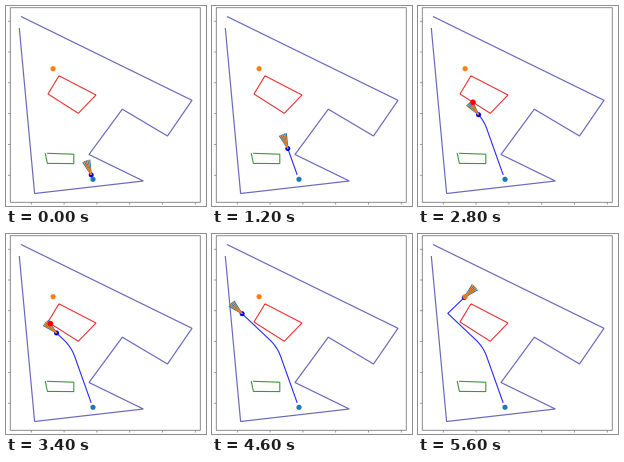
A matplotlib script that plays this animation: 200x200 px, repeating every 5.8 s.

```python
import numpy as np
import matplotlib.pyplot as plt
from matplotlib.animation import FuncAnimation
from matplotlib.patches import Circle

PX = 0.72  # one pixel in points at 100 dpi
STEPS, STEP_MS = 29, 200
SPEED, LAG = 4.67, 3  # pixels per step, pixels the view trails the motion
RAYS, REACH, SPREAD = 9, 15.3, np.radians(14)

START, GOAL = (87, 173.3), (47.1, 62.7)
FIRST, BEND, TURN = np.array([(85.2, 168.9), (65.3, 113), (29.8, 79.4)])
WALL = [(15, 10.5), (186, 94.3), (161.5, 130), (116.3, 103.2), (83, 148.5),
        (137.3, 175), (28.6, 187.5), (13.3, 22)]
RED_BOX = [(53, 69.8), (90, 89), (72.3, 107.3), (42, 88), (53, 69.8)]
GREEN_BOX = [(39.2, 147), (41.4, 157.4), (67.8, 157.6), (67.8, 148.2), (41, 147.3)]


def rounded(a, corner, b, r=10):
    """Quadratic curve that cuts the corner r pixels to either side."""
    p, q = (corner + r * (e - corner) / np.hypot(*(e - corner)) for e in (a, b))
    u = np.linspace(0, 1, 12)[:, None]
    return (1 - u) ** 2 * p + 2 * u * (1 - u) * corner + u ** 2 * q


route = np.vstack([FIRST, rounded(FIRST, BEND, TURN), TURN, GOAL])
dist = np.r_[0, np.cumsum(np.hypot(*np.diff(route, axis=0).T))]


def position(s):
    return np.array([np.interp(s, dist, axis) for axis in route.T])


def heading(s):
    """Direction of the route just behind distance s."""
    k = np.searchsorted(dist, max(s - LAG, 0.1)) - 1
    dx, dy = route[k + 1] - route[k]
    return np.arctan2(-dy, dx)


def direction(a):
    return np.array([np.cos(a), -np.sin(a)])


def hit(p, d):
    """Point where a ray meets the lower left side of the red box."""
    a, b = np.array(RED_BOX[2:4])
    t, u = np.linalg.solve(np.column_stack([d, a - b]), a - p)
    return p + t * d if 0 < t <= REACH and 0 <= u <= 1 else None


fig = plt.figure(figsize=(2, 2), dpi=100, facecolor="white")
ax = fig.add_axes([0, 0, 1, 1])
ax.set(xlim=(0, 200), ylim=(200, 0))
ax.axis("off")


def line(points, color, width, z=2):
    return ax.plot(*zip(*points), color=color, lw=width * PX, zorder=z, snap=False,
                   solid_capstyle="butt", solid_joinstyle="miter")[0]


def dot(center, radius, color, z):
    return ax.add_patch(Circle(center, radius, fc=color, ec="none", zorder=z))


LEFT, RIGHT, TOP, BOTTOM = 4.3, 194.3, 1.7, 196.3
GREY = "#808080"
line([(LEFT, TOP), (RIGHT, TOP), (RIGHT, BOTTOM), (LEFT, BOTTOM), (LEFT, TOP)], GREY, 0.9)
for k in range(6):
    x, y = 25.3 + 32.8 * k, 15.2 + 30.8 * k
    line([(x, BOTTOM), (x, BOTTOM + 2.2)], GREY, 0.8)
    line([(LEFT - 2.2, y), (LEFT, y)], GREY, 0.8)

line(WALL, "#6a6abc", 1.2)
line(RED_BOX, "#e83030", 1.1)
line(GREEN_BOX, "#3c963c", 1.1)
dot(START, 2.6, "C0", 5)
dot(GOAL, 2.6, "C1", 5)

trail = line([FIRST, FIRST], "#2828ff", 1.1, 3)
robot = dot(FIRST, 2.5, "#0000f0", 4)
rays = [line([FIRST, FIRST], f"C{k % 2}", 1.2 - 0.4 * (k % 2), 6 + k % 2)
        for k in range(RAYS)]
alarm = dot(FIRST, 2.8, "red", 8)


def update(i):
    s = SPEED * i
    p = position(s)
    trail.set_data(*np.vstack([route[dist < s], p]).T)
    robot.center = p
    angles = heading(s) + np.linspace(-SPREAD, SPREAD, RAYS)
    for ray, a in zip(rays, angles):
        ray.set_data(*np.array([p, p + REACH * direction(a)]).T)
    spot = hit(p, direction(angles[0]))
    alarm.set_visible(spot is not None)
    if spot is not None:
        alarm.center = spot
    return [trail, robot, alarm, *rays]


anim = FuncAnimation(fig, update, frames=STEPS, interval=STEP_MS,
                     repeat=True, repeat_delay=0)
plt.show()
```
